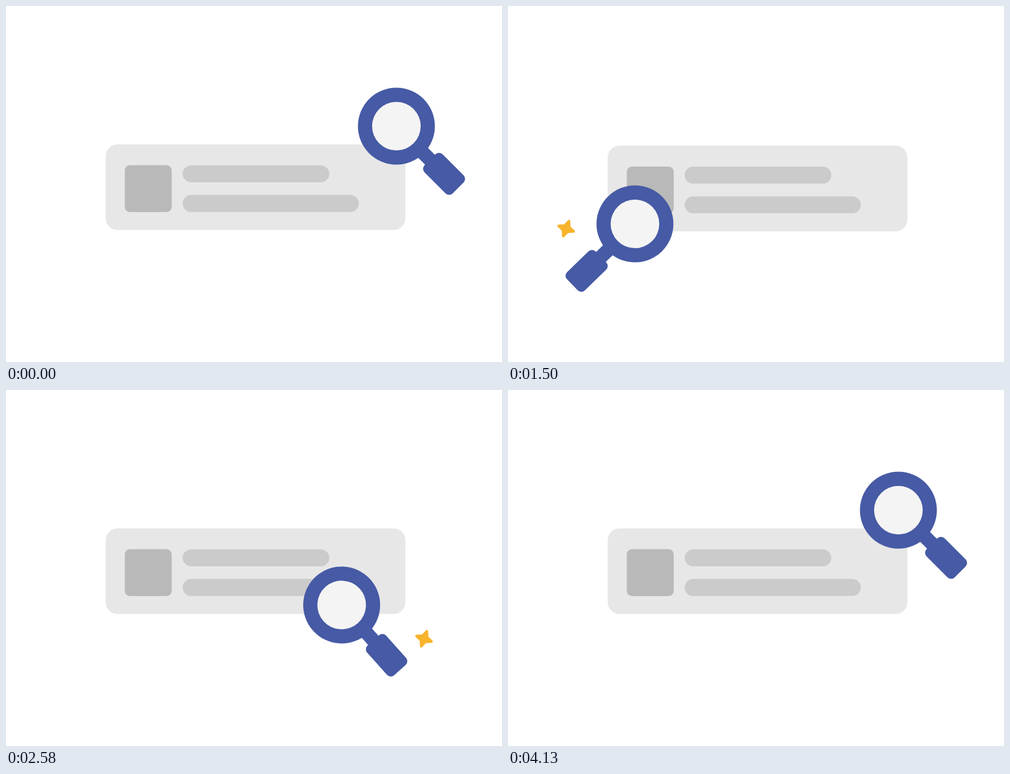
Recreate the animation shown at these times as an HTML page with a canvas. Size 883 px wide and 634 px high, loop 4.33 s.

```html
<!DOCTYPE html>
<html lang="en">
<head>
<meta charset="utf-8">
<title>Search loop</title>
<style>
  html, body { margin: 0; width: 100%; height: 100%; overflow: hidden; background: #fff; }
  canvas { display: block; }
</style>
</head>
<body>
<canvas id="stage" width="883" height="634"></canvas>
<script>
const ctx = document.getElementById('stage').getContext('2d');
const LOOP = 4330, FPS = 24, LAST = 99;
const BLUE = '#465aa5', GOLD = '#f7b42c';

// Magnifier legs; it turns about a pivot 42px down the handle.
const PIVOT = 42;
const legs = [
  { start: 1, end: 31, from: [724.7, 243.7, 45], to: [195.9, 417.3, -45.8] },
  { start: 36, end: 60, from: [195.9, 417.3, -45.8], to: [625.5, 414.3, 41.8] },
  { start: 60, end: 98, from: [625.5, 414.3, 41.8], to: [724.7, 243.7, 45] }
];

const swaps = [0, 32, 65];

const stars = [
  { x: 103.5, y: 396.5, start: 23.4, end: 44 },
  { x: 744.2, y: 443, start: 49.4, end: 70 },
  { x: 569, y: 175, start: 83.8, end: 98 }
];

const clamp = v => Math.min(1, Math.max(0, v));
const easeInOut = t => t < 0.5 ? 4 * t ** 3 : 1 - 4 * (1 - t) ** 3;

function box(x, y, w, h, r, color) {
  ctx.fillStyle = color;
  ctx.beginPath();
  ctx.roundRect(x, y, w, h, r);
  ctx.fill();
}

function disc(r, color) {
  ctx.fillStyle = color;
  ctx.beginPath();
  ctx.arc(0, 0, r, 0, Math.PI * 2);
  ctx.fill();
}

function card(y) {
  ctx.save();
  ctx.translate(0, y);
  box(177.5, 246.5, 533.5, 152.5, 21, '#e7e7e7');
  box(211.5, 283.6, 83.5, 83.4, 9, '#b9b9b9');
  box(314.5, 283.8, 261, 30.2, 15.1, '#cbcbcb');
  box(314.5, 336.6, 313.5, 30.2, 15.1, '#cbcbcb');
  ctx.restore();
}

// Leaves upward after a small dip.
function leaving(f) {
  const u = Math.max(0, (f - 3) / 12);
  return -225 * (2.70158 * u ** 3 - 1.70158 * u * u);
}

// Arrives from below, overshoots and settles.
function arriving(f) {
  const v = Math.max(0, 26.3 - f);
  return 137 * (v / 13.3) ** 8 - 0.19 * v * v;
}

function cards(frame) {
  const start = swaps.filter(s => s <= frame).pop();
  const f = frame - start;
  ctx.save();
  ctx.beginPath();
  ctx.rect(170, 173, 550, 281);
  ctx.clip();
  if (f < 16) card(leaving(f));
  if (f > 11) card(arriving(f));
  ctx.restore();
}

function magnifier(frame) {
  const leg = legs.filter(l => l.start <= frame).pop() || legs[0];
  const k = easeInOut(clamp((frame - leg.start) / (leg.end - leg.start)));
  const [x, y, angle] = leg.from.map((a, i) => a + (leg.to[i] - a) * k);
  ctx.save();
  ctx.translate(x, y);
  ctx.rotate(-angle * Math.PI / 180);
  ctx.translate(0, -PIVOT);
  box(-12.3, 60, 24.6, 32, 0, BLUE);
  box(-22.7, 84.5, 45.4, 71, 9, BLUE);
  disc(68.5, BLUE);
  disc(43.3, '#f4f4f4');
  ctx.restore();
}

function star({ x, y, start, end }, frame) {
  const size = Math.min(clamp((frame - start) / 6), clamp((end - frame) / 4));
  if (!size) return;
  ctx.save();
  ctx.translate(x, y);
  ctx.scale(size, size);
  ctx.rotate(0.36);
  ctx.beginPath();
  for (let i = 0; i < 8; i++) {
    const r = i % 2 ? 6 : 14.3, a = i * Math.PI / 4;
    ctx.lineTo(r * Math.sin(a), -r * Math.cos(a));
  }
  ctx.closePath();
  ctx.fillStyle = ctx.strokeStyle = GOLD;
  ctx.lineWidth = 4.6;
  ctx.lineJoin = 'round';
  ctx.fill();
  ctx.stroke();
  ctx.restore();
}

function draw(now) {
  const t = now % LOOP;
  const frame = Math.min(LAST, Math.floor((t + 4) * FPS / 1000));
  ctx.fillStyle = '#fff';
  ctx.fillRect(0, 0, 883, 634);
  cards(frame);
  stars.forEach(s => star(s, frame));
  magnifier(frame);
}

const began = performance.now();
function tick() {
  draw(performance.now() - began);
  requestAnimationFrame(tick);
}
tick();
</script>
</body>
</html>
```
